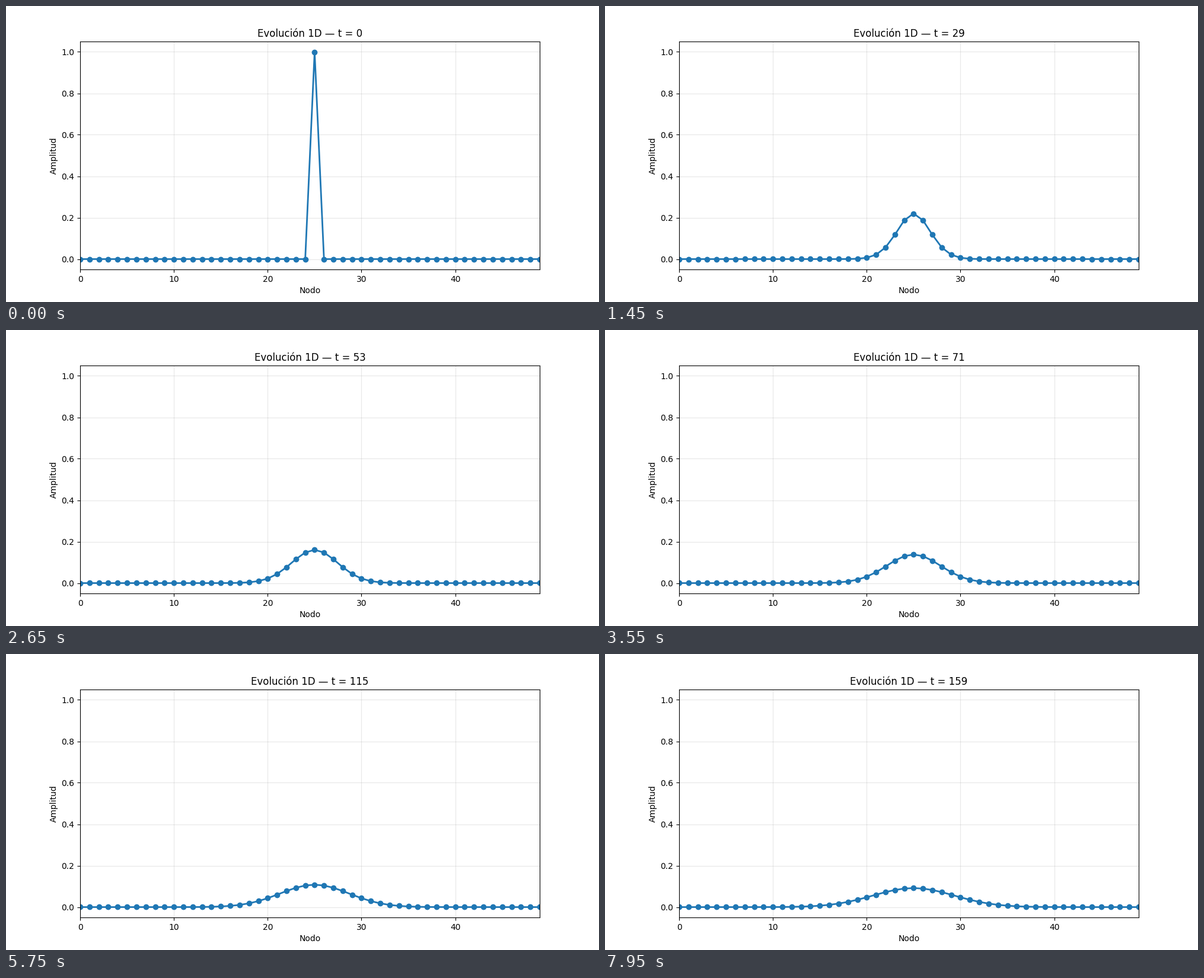
Animation, 1000 px wide and 500 px high, one loop 8 s. Source, as a matplotlib script:

```python
import numpy as np
import matplotlib.pyplot as plt
from matplotlib.animation import FuncAnimation

NODES = 50
STEPS = 160
RATE = 0.06  # share passed to each neighbour per step


def diffuse(u):
    """One explicit step of the heat equation on a chain with closed ends."""
    padded = np.pad(u, 1, mode="edge")
    return u + RATE * (padded[:-2] - 2 * u + padded[2:])


history = [np.zeros(NODES)]
history[0][NODES // 2] = 1.0
for _ in range(STEPS - 1):
    history.append(diffuse(history[-1]))

fig, ax = plt.subplots(figsize=(10, 5), dpi=100)
line, = ax.plot(np.arange(NODES), history[0], "o-", color="#1f77b4", lw=2)
ax.set_xlim(0, NODES - 1)
ax.set_ylim(-0.05, 1.05)
ax.set_xlabel("Nodo")
ax.set_ylabel("Amplitud")
ax.grid(True, alpha=0.3)
title = ax.set_title("")


def update(t):
    line.set_ydata(history[t])
    title.set_text(f"Evolución 1D — t = {t}")
    return line, title


anim = FuncAnimation(fig, update, frames=STEPS, interval=50,
                     init_func=lambda: update(0), repeat=True, repeat_delay=0)
plt.show()
```
